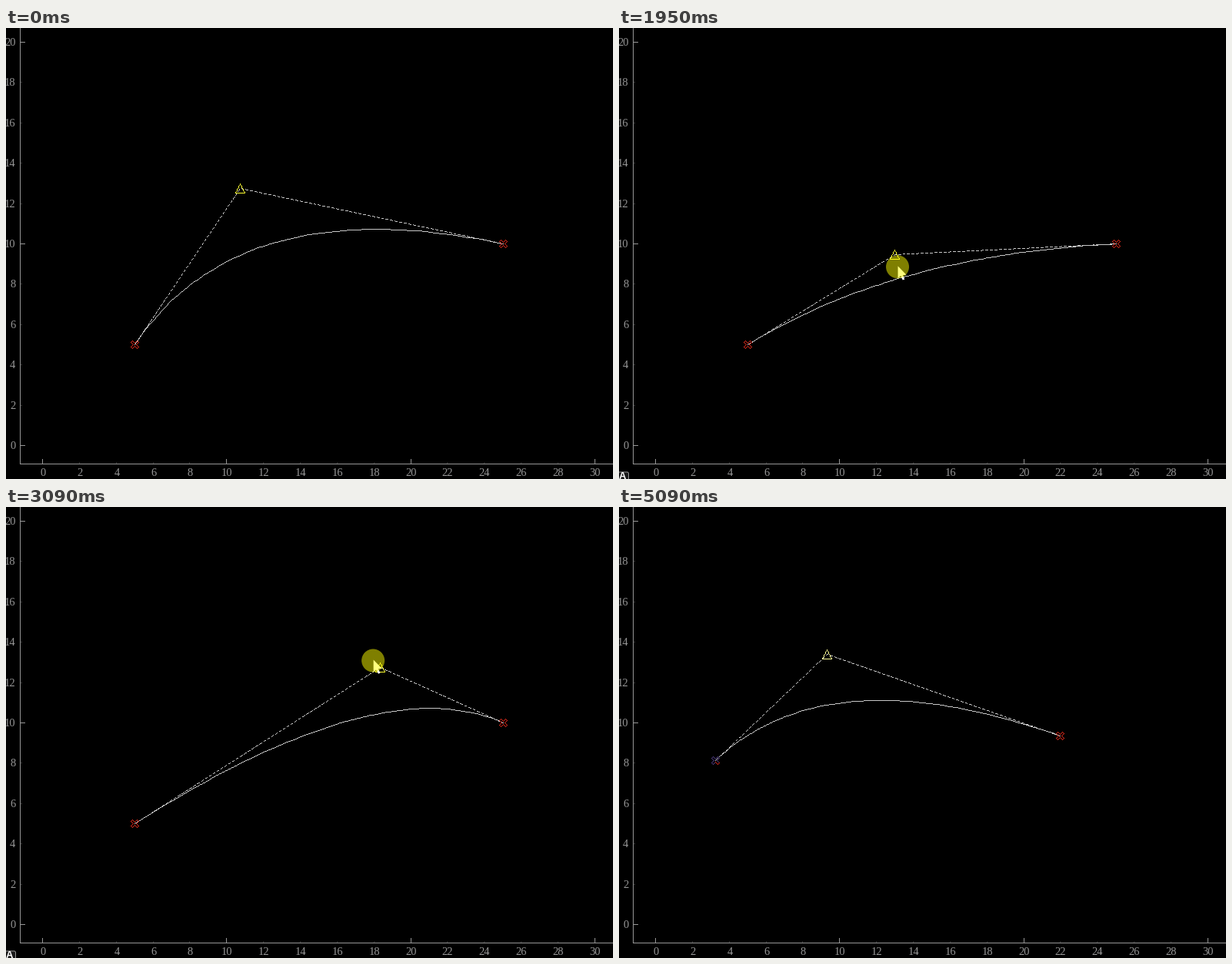
Write a matplotlib script that moves like this. It is 789 by 586 pixels and loops after 5.38 s.

```python
import numpy as np
import matplotlib.pyplot as plt
from matplotlib.animation import FuncAnimation
from matplotlib.patches import Circle, FancyBboxPatch, Polygon

plt.rcParams["path.simplify"] = False

W, H, DPI = 789, 586, 100
STEP, LOOP, REDRAW, LAG = 20, 5380, 40, 25
PX = 72 / DPI


def rgb(r, g, b):
    return r / 255, g / 255, b / 255


GRAY, FAINT, CURVE = rgb(150, 150, 150), rgb(50, 50, 50), rgb(200, 200, 200)
RED, MAGENTA, BLUE = rgb(235, 45, 30), rgb(255, 0, 255), rgb(60, 60, 200)
WORN = rgb(85, 65, 140)
YELLOW, PALE = rgb(255, 255, 50), rgb(255, 255, 150)

# Pointer strokes: start, end, goal, sideways bow
ENTRY = (727, 572)
STROKES = [
    (200, 640, (302, 208), (0, 0)),
    (1180, 1420, (267, 181), (0, 0)),
    (1420, 1680, (332, 213), (0, 0)),
    (1680, 2240, (407, 459), (0, 0)),
    (2240, 2440, (428, 474), (0, 0)),
    (2560, 3130, (470, 191), (89, 22)),
    (3130, 3390, (268.5, 191), (0, 0)),
    (3420, 3640, (169, 411), (-65, 0)),
    (3820, 4090, (127, 329), (0, 0)),
    (4110, 4400, (650, 281), (0, 0)),
    (4520, 4850, (577, 298), (0, 0)),
    (4900, 5060, (733, 580), (0, 0)),
]


def pointer(t):
    p = np.array(ENTRY, float)
    for start, end, goal, bow in STROKES:
        if t <= start:
            break
        s = min(1, (t - start) / (end - start))
        u = s * s * (3 - 2 * s)
        p = p + (goal - p) * u + 4 * u * (1 - u) * np.array(bow)
    return p


def dragged(t, start, end, offset):
    """A handle follows the pointer slightly late while it is dragged."""
    return pointer(np.clip(t - LAG, start, end)) + offset


def within(t, *windows):
    return any(a <= t < b for a, b in windows)


def cross_shape(size):
    arm = np.array([(.5, -.125), (.5, .125), (.125, .125)])
    turns = []
    for k in range(4):
        a = np.pi / 4 + k * np.pi / 2
        turn = np.array([[np.cos(a), np.sin(a)], [-np.sin(a), np.cos(a)]])
        turns.append(arm @ turn)
    return size * np.concatenate(turns)


def closed(points):
    return np.concatenate([points, points[:1]])


CROSS = cross_shape(12)
CORNER = CROSS[:3]
TRIANGLE = np.array([(-6, 6), (0, -6), (6, 6)])
ARROW = np.array([(0, 0), (0, 16), (3.7, 12.6), (6.2, 18.2),
                  (8.8, 17.2), (6.4, 11.7), (11, 11.4)])
U = np.linspace(0, 1, 60)[:, None]

fig = plt.figure(figsize=(W / DPI, H / DPI), dpi=DPI, facecolor="black")
ax = fig.add_axes([0, 0, 1, 1])
ax.set_xlim(0, W)
ax.set_ylim(H, 0)
ax.axis("off")


def line(xs, ys, color, zorder=2):
    return ax.plot(xs, ys, color=color, lw=PX, snap=False, zorder=zorder,
                   solid_capstyle="butt")[0]


def label(x, y, value, ha):
    ax.text(x, y, str(value), color=GRAY, family="Liberation Serif",
            size=14.5 * PX, ha=ha, va="center")


def trace(art, points, dash=None):
    """Draw a polyline as whole pixels, without smoothing."""
    points = np.rint(points)
    parts = []
    for p, q in zip(points[:-1], points[1:]):
        n = int(max(abs(q - p).max(), 1))
        parts.append(p + (q - p) * np.arange(n + 1)[:, None] / n)
    path = np.concatenate(parts)
    if dash:
        on, off = dash
        steps = np.hypot(*np.diff(path, axis=0, prepend=path[:1]).T)
        path = path[np.cumsum(steps) % (on + off) < on]
    x, y = np.rint(path).T
    art.set_data(np.stack([x, x + 1, x * np.nan], axis=1).ravel(),
                 np.repeat(y + .5, 3))


def draw_scales():
    line([18.5, 18.5], [0, 567], GRAY)
    line([18, W], [566.5, 566.5], GRAY)
    for v in range(0, 31, 2):
        size, color = (6, GRAY) if v % 10 == 0 else (2, FAINT)
        x = 47.5 + round(v * 23.93)
        line([x, x], [566, 566 - size], color)
        label(x + .5, 579, v, "center")
        if v <= 20:
            y = 542.5 - round(v * 26.2)
            line([19, 19 + size], [y, y], color)
            label(12.5, y + 1, v, "right")


draw_scales()
badge = [
    ax.add_patch(FancyBboxPatch((-8, 577), 20.5, 20,
                                boxstyle="round,pad=0,rounding_size=2",
                                fc=rgb(25, 25, 25), ec=GRAY, lw=PX)),
    ax.text(4.5, 583, "A", color="white", family="Liberation Sans",
            weight="bold", size=13 * PX, ha="center", va="center",
            clip_on=True)]
curve, guide = line([], [], CURVE, 3), line([], [], CURVE, 3)
glow = ax.add_patch(Polygon(CROSS, fc=BLUE, ec="none", zorder=3))
left, right = line([], [], RED, 4), line([], [], RED, 4)
corner = line([], [], RED, 5)
handle = line([], [], YELLOW, 4)
arrow = ax.add_patch(Polygon(ARROW, fc="white", ec="none", zorder=6))
halo = ax.add_patch(Circle((0, 0), 15, fc=(1, 1, 0, .5), ec="none", zorder=7))


def mark(art, points, center, color, hovered):
    trace(art, closed(points) + np.rint(center))
    art.set_color(MAGENTA if hovered else color)


def update(i):
    t = i * STEP // REDRAW * REDRAW
    a = dragged(t, 3820, 4090, (-2, 0))
    b = dragged(t, 1180, 3390, (1.6, 0))
    c = dragged(t, 4520, 4850, (-4, -1))

    trace(curve, (1 - U) ** 2 * a + 2 * U * (1 - U) * b + U * U * c)
    trace(guide, np.array([a, b, c]), dash=(4, 2))

    over_a = within(t, (3600, 3820))
    over_c = within(t, (4390, 4520))
    worn = t >= 4110
    mark(left, CROSS, a, WORN if worn else RED, over_a)
    mark(right, CROSS, c, RED, over_c)
    mark(handle, TRIANGLE, b, PALE if t >= 3400 else YELLOW,
         within(t, (640, 1180)))
    trace(corner, CORNER + np.rint(a))
    corner.set_visible(worn)
    glow.set_xy(CROSS + (a if over_a else c) + .5)
    glow.set_visible(over_a or over_c)

    p = pointer(t)
    arrow.set_xy(ARROW + p + (1, -.5))
    halo.center = p + .5
    halo.set_visible(within(t, (860, 3400), (3780, 4110), (4440, 4900)))
    inside = within(t, (200, 5080))
    for part in (arrow, *badge):
        part.set_visible(inside)
    return curve, guide, glow, left, right, corner, handle, arrow, halo, *badge


anim = FuncAnimation(fig, update, frames=LOOP // STEP, interval=STEP,
                     init_func=lambda: update(0), repeat=True, repeat_delay=0)
plt.show()
```
